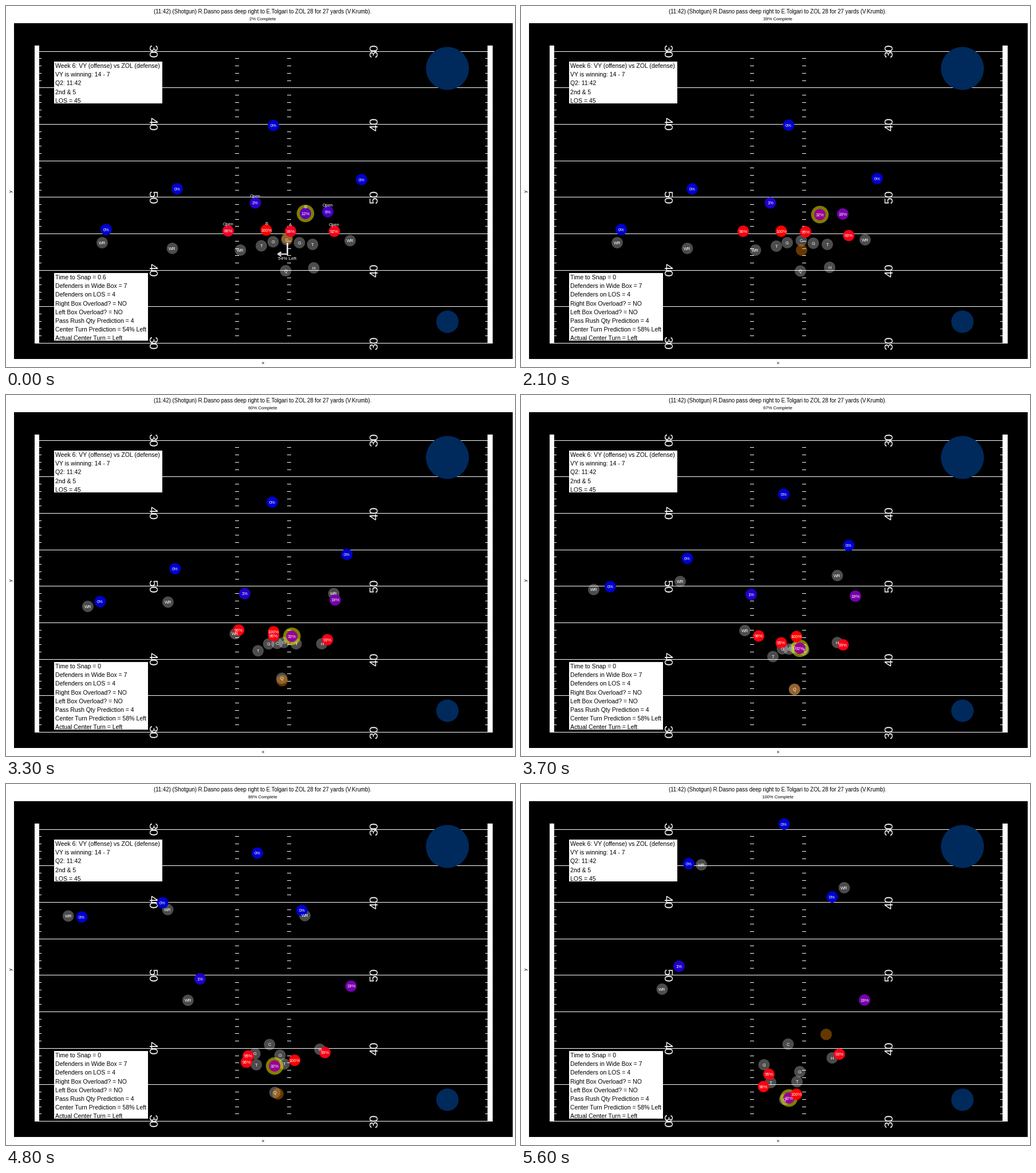
Recreate the animation shown at these times as a matplotlib script. Size 889x630 px, loop 5700 ms.

```python
import numpy as np
import matplotlib.pyplot as plt
from matplotlib.animation import FuncAnimation
from matplotlib.patches import Circle, Rectangle

W, H, DPI = 889, 630, 100
FRAMES, INTERVAL = 57, 100
SNAP, RESUME = 6, 18              # play freezes between these frames
TIMES = (0, 9, 17, 25, 31, 40, 44)  # play clock of the way points, in 0.1 s

plt.rcParams["font.family"] = "Liberation Sans"
fig = plt.figure(figsize=(W / DPI, H / DPI), dpi=DPI, facecolor="white")
ax = fig.add_axes([0, 0, 1, 1])
ax.set_xlim(0, W)
ax.set_ylim(H, 0)
ax.axis("off")


def rect(x0, y0, x1, y1, color="white", z=1):
    ax.add_patch(Rectangle((x0, y0), x1 - x0, y1 - y0, fc=color, ec="none",
                           lw=0, aa=False, zorder=z))


def disc(r, color, z, alpha=None, at=(0, 0)):
    return ax.add_patch(Circle(at, r, fc=color, ec="none", lw=0,
                               alpha=alpha, zorder=z))


def write(x, y, s, px, color="white", ha="center", z=8):
    """Text whose capitals are centred on y."""
    return ax.text(x, y + 0.36 * px, s, fontsize=px * 72 / DPI, color=color,
                   ha=ha, va="baseline", zorder=z)


def place(text, x, y, px):
    text.set_position((x, y + 0.36 * px))


def heat(p):
    """Blue to red for a rush probability of 0 to 1."""
    return p ** 0.46, 0, 205 / 255 * (1 - p) ** 0.85


class Path:
    """Smooth Hermite curve through way points."""

    def __init__(self, points, times=TIMES):
        t, p = np.array(times, float), np.array(points, float)
        if SNAP not in times:
            p = np.insert(p, 1, p[0] + (p[1] - p[0]) * SNAP / t[1], axis=0)
            t = np.insert(t, 1, SNAP)
        self.t, self.p = t, p
        self.v = np.gradient(p, t, axis=0)
        self.v[:2] = 0

    def at(self, t):
        i = int(np.clip(np.searchsorted(self.t, t, "right") - 1,
                        0, len(self.t) - 2))
        h = self.t[i + 1] - self.t[i]
        s = (t - self.t[i]) / h
        a, b = self.p[i], self.p[i + 1]
        va, vb = self.v[i] * h, self.v[i + 1] * h
        return (a + s * va + s * s * (3 * (b - a) - 2 * va - vb)
                + s ** 3 * (2 * (a - b) + va + vb))


class Blocker:
    def __init__(self, role, *points):
        self.path = Path(points)
        self.dot = disc(9.9, "white", 2, 0.3)
        self.text = write(0, 0, role, 7.5, z=6)

    def move(self, t):
        self.pos = x, y = self.path.at(t)
        self.dot.center = x, y
        place(self.text, x, y, 7.5)


class Rusher:
    def __init__(self, start, end, tag, *points, halo=False):
        self.start, self.end = start, end
        self.path = Path(points)
        self.halo = disc(15.3, "yellow", 4, 0.5) if halo else None
        self.dot = disc(9.9, "blue", 5)
        self.text = write(0, 0, "", 7.5, z=6)
        self.tag = write(0, 0, tag, 7.8, z=6)

    def move(self, t, k, tagged):
        x, y = self.path.at(t)
        pct = round(self.start + (self.end - self.start) * k)
        for d in filter(None, (self.dot, self.halo)):
            d.center = x, y
        self.dot.set_facecolor(heat(pct / 100))
        self.text.set_text(f"{pct}%")
        place(self.text, x, y, 7.5)
        place(self.tag, x, y - 12, 7.8)
        self.tag.set_visible(tagged)


def draw_field():
    rect(14, 30, 885, 616, "black", 0)
    rect(50, 69, 58, 589)
    rect(841, 69, 850, 589)
    for yard in range(41):
        y = round(78.6 + 12.74 * yard)
        if yard % 5 == 0:
            rect(58, y, 841, y + 1)
            continue
        for x, w in ((58, 4), (400, 7), (491, 7), (837, 5)):
            rect(x, y, x + w, y + 1)
    for i, n in enumerate((30, 40, 50, 40, 30)):
        for x, turn in ((254.5, 270), (643.5, 90)):
            ax.text(x, 78.6 + 127.4 * i, n, fontsize=21 * 72 / DPI,
                    color="white", rotation=turn, ha="center", va="center",
                    zorder=1)
    disc(37.5, "#002A5C", 1, at=(771, 109))
    disc(19.5, "#002A5C", 1, at=(771, 551))


def info(x1, y0, y1, lines):
    rect(84, y0, x1, y1, z=7)
    return [write(86, y0 + 7.3 + 15.2 * i, s, 10.5, "black", "left")
            for i, s in enumerate(lines)]


draw_field()
write(448, 9.5, "(11:42) (Shotgun) R.Dasno pass deep right to E.Tolgari "
      "to ZOL 28 for 27 yards (V.Krumb).", 9.65, "black")
progress = write(448.5, 22, "", 7.75, "black")
write(449, 622.5, "x", 8, "black")
ax.text(9.5, 323, "y", fontsize=8 * 72 / DPI, rotation=90,
        ha="center", va="center")

info(272.5, 97, 170, ["Week 6: VY (offense) vs ZOL (defense)",
                      "VY is winning: 14 - 7", "Q2: 11:42", "2nd & 5",
                      "LOS = 45"])
facts = info(248, 466, 584, ["", "Defenders in Wide Box = 7",
                             "Defenders on LOS = 4",
                             "Right Box Overload? = NO",
                             "Left Box Overload? = NO",
                             "Pass Rush Qty Prediction = 4", "",
                             "Actual Center Turn = Left"])

center = Blocker("C", (490.5, 408), (489.5, 409.5), (479, 423), (468, 443.5),
                 (461, 452.5), (462.5, 454.5), (466.5, 454))
offense = [center]
offense.append(Blocker(
    "WR", (168, 413), (168, 413), (158, 391.5), (127, 339.5),
    (114, 284), (108.5, 187), (112, 147)))
offense.append(Blocker(
    "WR", (290.5, 423), (290.5, 423), (287.5, 391.5), (278, 325.5),
    (273.5, 268), (296.5, 180), (315, 141)))
offense.append(Blocker(
    "WR", (409.5, 426), (409.5, 426), (404.5, 420), (391, 411),
    (359.5, 394.5), (281, 365.5), (246.5, 358)))
offense.append(Blocker(
    "WR", (601, 409.5), (601, 408), (589, 374.5), (552.5, 315),
    (523, 268), (536.5, 202.5), (564.5, 181)))
offense.append(Blocker(
    "T", (446, 418.5), (446, 419), (441, 436.5), (440, 456.5),
    (440, 471.5), (435.5, 506), (436, 521)))
offense.append(Blocker(
    "G", (466.5, 411.5), (465, 413), (459.5, 426.5), (456.5, 443),
    (444.5, 458), (428.5, 480.5), (424.5, 490)))
offense.append(Blocker(
    "G", (512.5, 413), (510.5, 414), (494, 423.5), (478, 441.5),
    (473.5, 457), (484, 487.5), (487, 502)))
offense.append(Blocker(
    "T", (535.5, 416), (535, 416), (520.5, 426), (494, 445),
    (487.5, 467.5), (484.5, 505), (482, 519.5)))
offense.append(Blocker(
    "H", (537.5, 457), (539, 456), (549.5, 441), (552.5, 432),
    (553.5, 446), (544, 474), (543.5, 478)))
offense.append(Blocker(
    "Q", (488.5, 462), (488, 462.5), (485.5, 476.5), (477.5, 513.5),
    (473, 533), (466, 542), (460.5, 550.5)))

defense = []
defense.append(Rusher(
    0, 0, "", (175, 390), (175, 390), (171.5, 379), (156, 334.5),
    (144, 283), (128, 190), (133, 150)))
defense.append(Rusher(
    0, 0, "", (299, 319), (299, 319), (298, 315), (290.5, 285),
    (278, 245.5), (278, 174), (293, 139)))
defense.append(Rusher(
    0, 0, "", (467, 208.5), (467.5, 208), (468, 198), (459, 173),
    (444.5, 148), (443.5, 96), (459.5, 70)))
defense.append(Rusher(
    0, 0, "", (621, 303), (622, 301), (612.5, 291), (572.5, 262.5),
    (533, 237.5), (520.5, 208.5), (543.5, 197)))
defense.append(Rusher(
    2, 1, "Open", (435.5, 343.5), (435.5, 343.5), (427.5, 345), (402, 348),
    (373, 347), (308, 330.5), (276, 318)))
defense.append(Rusher(
    12, 32, "B", (523, 362), (522, 364), (511, 399.5), (487, 442),
    (474, 465.5), (468, 518), (468, 548), halo=True))
defense.append(Rusher(
    6, 19, "Open", (562, 359), (562, 363), (567.5, 363), (584, 351),
    (598, 343.5), (602.5, 365), (600, 377)))
defense.append(Rusher(
    86, 96, "Open", (388, 392.5), (388, 393), (397, 404), (415, 420.5),
    (418, 451), (421.5, 511), (423.5, 528)))
defense.append(Rusher(
    100, 100, "B", (454.5, 391), (454.5, 393), (457, 408), (481, 421.5),
    (503.5, 448), (495.5, 512.5), (481, 541.5)))
defense.append(Rusher(
    89, 95, "A", (497, 393), (497, 394), (479, 409), (454.5, 432.5),
    (433.5, 451.5), (423, 493), (433, 506.5)))
defense.append(Rusher(
    92, 93, "Open", (573.5, 393), (572.5, 400.5), (561.5, 419), (562.5, 436),
    (562.5, 454.5), (554, 474.5), (556, 471.5)))

ball = disc(9.9, "darkorange", 3, 0.4)
carry = Path([(491, 405), (491, 406), (490, 426), (487.5, 457), (486.5, 481),
              (478, 514), (477, 533), (473, 545)],
             (0, SNAP, 9, 12, 17, 25, 31, 40))
throw = Path([(473, 545), (480, 535), (533, 437)], (40, 41, 44))
throw.v[1:] = (53 / 3, -98 / 3)

stem, = ax.plot([], [], color="white", lw=1.8, zorder=6)
arrow, = ax.plot([], [], color="lightgray", lw=1.8, zorder=6)
turn = write(0, 0, "", 8.1, z=6)


def update(n):
    t = min(n, SNAP) + max(n - RESUME, 0)
    k = min(n / SNAP, 1)
    before = n <= RESUME
    for p in offense:
        p.move(t)
    for p in defense:
        p.move(t, k, before)
    ball.center = tuple((carry if t <= 40 else throw).at(t))

    guess = f"{round(54 + 4 * k)}% Left"
    x, y = center.pos
    stem.set_data([x + 0.5] * 2, [y + 6, y + 25])
    arrow.set_data([x, x - 15, x - 11, x - 15, x - 11],
                   [y + 25, y + 25, y + 22, y + 25, y + 28])
    turn.set_text(guess)
    place(turn, x + 0.5, y + 32.5, 8.1)
    for a in (stem, arrow, turn):
        a.set_visible(before)

    progress.set_text(f"{round(100 * (n + 1) / FRAMES)}% Complete")
    facts[0].set_text(f"Time to Snap = {max(SNAP - n, 0) / 10:g}")
    facts[6].set_text(f"Center Turn Prediction = {guess}")
    return []


anim = FuncAnimation(fig, update, frames=FRAMES, interval=INTERVAL,
                     init_func=lambda: update(0), repeat=True,
                     repeat_delay=0, blit=False)
plt.show()
```
